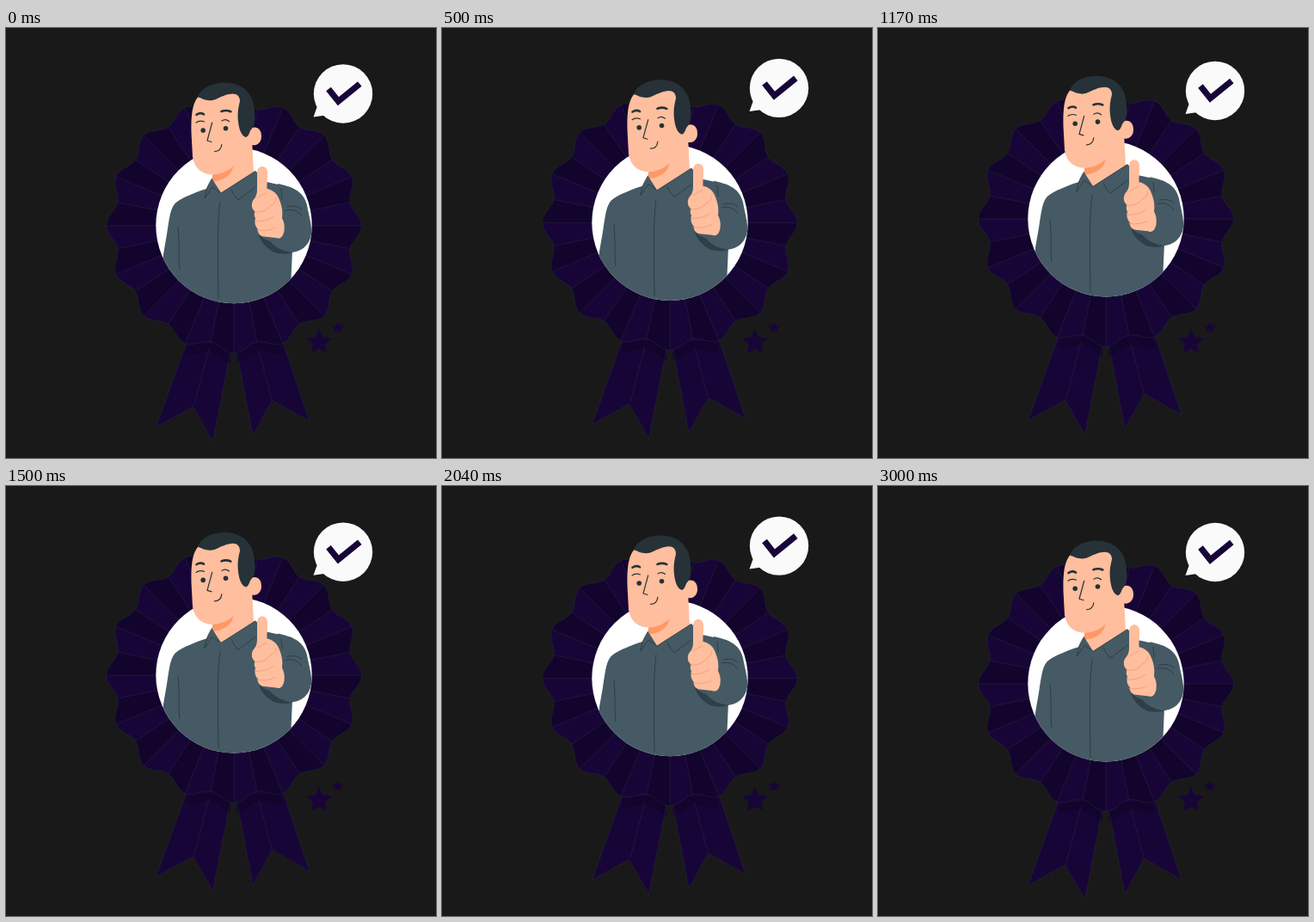
These frames come from a looping animation (500 px wide and 500 px high, 3.04 s). An HTML page:

```html
<!DOCTYPE html>
<html lang="en">
<head>
<meta charset="utf-8">
<title>Approved badge</title>
<style>
  html, body { margin: 0; width: 100%; height: 100%; overflow: hidden; background: #191919; }
  svg { display: block; width: 100vw; height: 100vh; }
  .purple { fill: #180538; }
  .shade { fill: #12042c; }
  .skin { fill: #ffbe9d; }
  .hair { fill: #263238; }
  .shirt { fill: #455a64; }
  .edge { fill: none; stroke: #262a3a; stroke-width: .5; }
  .seam { fill: none; stroke: #263238; stroke-width: .7; stroke-linecap: round; }
  .line { fill: none; stroke: #263238; stroke-width: 1.2; stroke-linecap: round; stroke-linejoin: round; }
  .brow { fill: none; stroke: #263238; stroke-width: 2.6; stroke-linecap: round; }
  .crease { fill: none; stroke: #f09a74; stroke-width: .8; stroke-linecap: round; }
</style>
</head>
<body>
<svg viewBox="0 0 500 500" xmlns="http://www.w3.org/2000/svg">
  <defs>
    <path id="ribbons" d="M212 355 L208 371 174.500 464 217.500 440.500 240.500 480.500 261 377 V355Z
      M268 355 L268.500 377 287 474 309.500 433 353 457.500 323 368 318 355Z"/>
    <path id="rim"/>
    <clipPath id="ribbonClip"><use href="#ribbons"/></clipPath>
    <clipPath id="discClip"><circle cx="265" cy="229.500" r="90.700"/></clipPath>
  </defs>

  <g id="stars" class="purple"></g>

  <g id="badge">
    <use href="#ribbons" class="purple"/>
    <use href="#rim" class="shade" y="12" clip-path="url(#ribbonClip)"/>
    <use href="#ribbons" class="edge"/>
    <path class="edge" d="M236 373 219 438M294 375 309 432"/>
    <use href="#rim" class="purple"/>
    <path id="folds" class="shade"/>
    <path id="ridges" class="edge"/>
    <use href="#rim" class="edge"/>
    <circle cx="265" cy="229.500" r="90.700" fill="#fff"/>

    <g clip-path="url(#discClip)">
      <path class="shirt" d="M239 176 L233 187 C220 191 206 197 199 202 C191 207 190 221 187 240 L183 263 180 325H330L333 258
        350 238 C346 213 346 191 330 185 L303 179 290 166 250 190Z"/>
      <path class="shirt" d="M316 181 C340 186 347 194 350 206 C352 218 356 229 355 239 C353 255 340 262 327 261
        C312 260 299 251 294 238 L314 200Z"/>
      <path fill="#2f3f47" d="M293 235 Q294 244 307 248 Q316 259 333 261 Q325 264 312 261 Q295 252 293 235Z"/>
      <path class="seam" d="M249 202 C246 222 246 255 247 315M200 231 C202 253 200 268 202 280"/>
      <path class="seam" d="M327 208 Q337 205 344 211M325 212 Q338 209 344 219M320 187 321 199"/>
    </g>

    <path class="skin" d="M240 160 L241 178 250 192 288 168 286 130Z"/>
    <path fill="#ff9866" d="M240 170 Q254 170 264.500 160 Q262 176 240 178.500Z"/>
    <path class="shirt" d="M239.500 175 250 192 241 187 231 198Z M250 192 289 167 292 183 270 200 262 187Z"/>
    <path class="seam" d="M239.500 175 Q233 184 231 198L240 185 250 192 289 167M262 188 Q265 195 270 200L290 185"/>

    <path class="skin" d="M225 78 C217 87 215 98 215.500 122 L217 150 C219 163 228 170.500 241 170.500 C258 169 269 160 282 137 L285 90 262 70Z"/>
    <path class="skin" d="M281 119 C289 112 297 116 297 126 C297 136 287 139 282 134Z"/>
    <path class="hair" d="M223 80.500 C226 71 238 63.500 255 63.500 C277 64 288 78 289 96 C290 106 289 113 286 117
      C283 119 283 126 279 127 C274 126 271 118 270 109 C269 99 270 93 272 85 C272 78 267 75 259 77
      C249 79 242 86 235 84 C230 84 227 81 223 80.500Z"/>
    <path class="brow" d="M221.500 100.800 Q226 97.800 230 100.300M250.500 97 Q256 94.800 261.300 97.200"/>
    <circle class="hair" cx="229.200" cy="119" r="2.800"/>
    <circle class="hair" cx="255.500" cy="116.800" r="2.800"/>
    <path class="line" d="M221 110 Q225 107 230.500 109M251 108 Q255 105 259.500 108.500M239.700 110 234 131 239 132.500M242.500 143.500 Q250 143.500 250.800 135.500"/>

    <path class="skin" d="M292 167 C293 159 303 159 304 167 C304.500 175 303 181 303.500 187 C310 188 316 193 318 200
      C321 207 322 214 321 221 C324 227 324 231 323.500 236 C322 243 319 246 314 244 L300 242.500 C295 242 292 238 293 234
      C289 230 289 225 290 221 C288 218 289 215 289.500 213.500 C285 210 285 204 287.500 200 C291 196 292 193 292 187Z"/>
    <path class="crease" d="M289 214 Q302 215 307 207 Q313 205 314 198M290 225 Q305 225 311 219M292 235 Q306 237 313 232M292 198 Q297 194 303 192"/>
  </g>

  <g id="bubble">
    <path fill="#fafafa" d="M363 88 357.500 103.500 375 101Z"/>
    <circle cx="392" cy="76.500" r="34.200" fill="#fafafa"/>
    <path d="M375 71 386.400 85.300 411.300 65" fill="none" stroke="#180538" stroke-width="7.200"/>
  </g>
</svg>
<script>
  const LOOP = 3040, FIRST = 40, LAST = 3000, LIFT = 10;
  const LOBES = 16, CX = 265, CY = 229.7;
  const el = id => document.getElementById(id);
  const at = (angle, r, x = CX, y = CY) =>
    `${(x + r * Math.cos(angle)).toFixed(2)} ${(y + r * Math.sin(angle)).toFixed(2)}`;
  const rimRadius = a => 143 + 5.4 * Math.cos(LOBES * a);
  const arc = (from, to, steps) => Array.from({ length: steps + 1 }, (_, i) => {
    const a = from + (to - from) * i / steps;
    return at(a, rimRadius(a));
  });

  function drawRosette() {
    const half = Math.PI / LOBES;
    let folds = '', ridges = '';
    for (let i = 0; i < LOBES * 2; i++) {
      const a = i * half;
      ridges += `M${at(a, 90)}L${at(a, rimRadius(a))}`;
      if (i % 2 === 0) folds += `M${at(a, 90)}L${arc(a, a + half, 8).join(' ')} ${at(a + half, 90)}Z`;
    }
    el('rim').setAttribute('d', `M${arc(0, Math.PI * 2, 256).join(' ')}Z`);
    el('folds').setAttribute('d', folds);
    el('ridges').setAttribute('d', ridges);
  }

  function star(x, y, r) {
    const points = Array.from({ length: 10 }, (_, i) =>
      at(-Math.PI / 2 + i * Math.PI / 5, i % 2 ? r * .48 : r, x, y));
    return `<path d="M${points.join(' ')}Z"/>`;
  }

  // Linear rise and fall, 0 -> 1 -> 0 over one period.
  function bob(time, period) {
    const p = (time % period) / period;
    return 1 - Math.abs(2 * p - 1);
  }

  function render(ms) {
    const time = FIRST + (ms % LOOP) * (LAST - FIRST) / (LOOP - 40);
    const shift = (id, period, rest) =>
      el(id).setAttribute('transform', `translate(0 ${(rest - LIFT * bob(time, period)).toFixed(3)})`);
    shift('badge', 3000, .27);
    shift('bubble', 1500, .5);
  }

  drawRosette();
  el('stars').innerHTML = star(364, 365.5, 15.5) + star(386, 349, 7);
  const start = performance.now();
  function tick() {
    render(performance.now() - start);
    requestAnimationFrame(tick);
  }
  tick();
</script>
</body>
</html>
```
